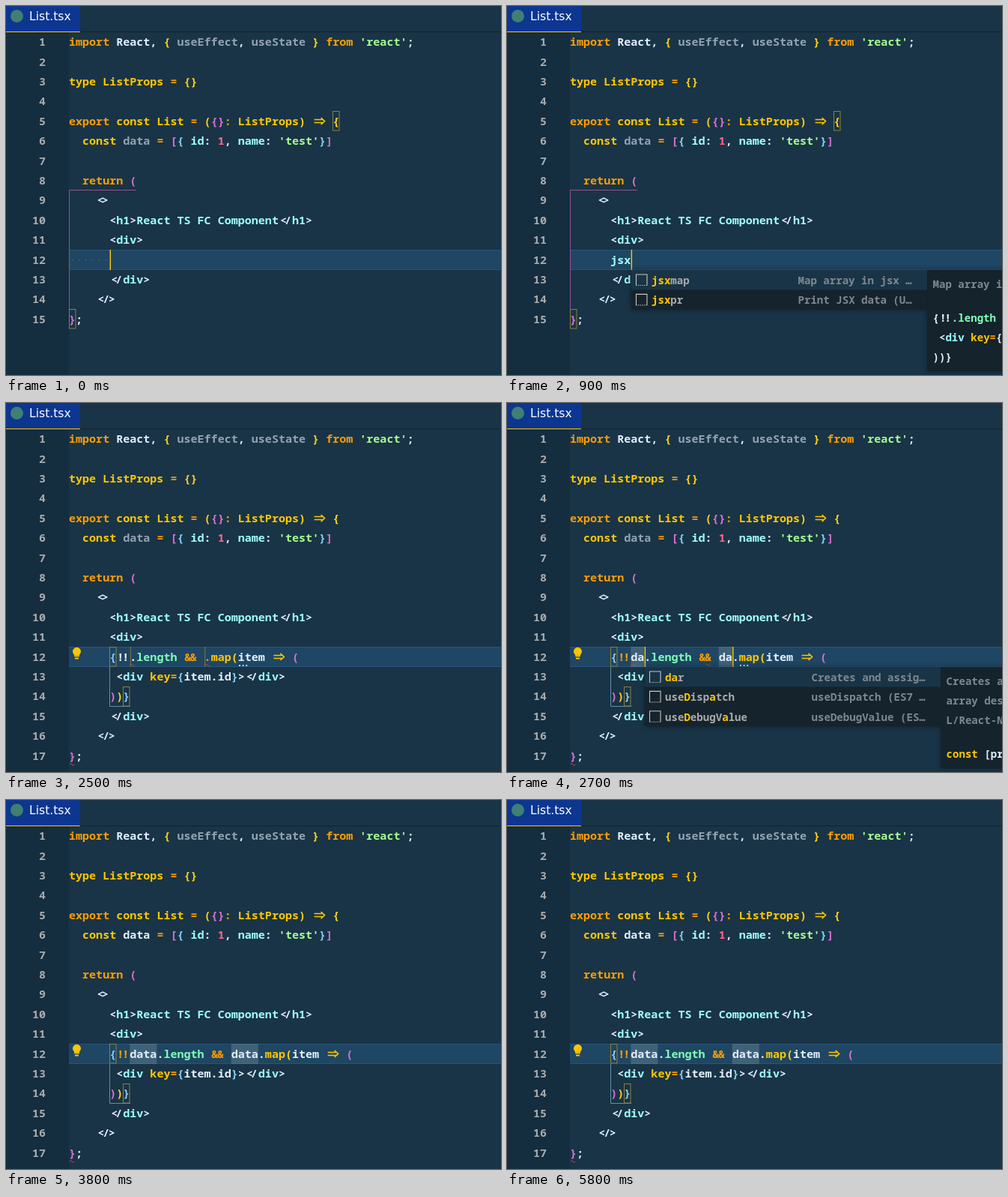
Recreate the animation shown at these times as an HTML page. Size 661 by 492 pixels, loop 5900 ms.

```html
<!DOCTYPE html>
<html lang="en">
<head>
<meta charset="utf-8">
<title>List.tsx</title>
<style>
  html, body { margin: 0; width: 100%; height: 100%; overflow: hidden; background: #193446; }
  svg { display: block; width: 661px; height: 492px; }
  text { white-space: pre; font: 600 15.05px "Noto Sans Mono", monospace; }
  .small text { font-size: 14.1px; }
  .popup { filter: drop-shadow(0 0 3px rgba(0, 0, 0, .4)); }
  .tab { font: 400 15.6px "DejaVu Sans", sans-serif; }
</style>
</head>
<body>
<svg id="stage" viewBox="0 0 661 492">
  <rect width="661" height="492" fill="#193446"/>
  <rect y="35" width="84" height="457" fill="#142d3f"/>
  <rect x="99" y="34" width="562" height="1" fill="#11232f"/>
  <rect width="99" height="34" fill="#0c3690"/>
  <rect y="34" width="99" height="1" fill="#ffc600"/>
  <circle cx="14.5" cy="13.5" r="8.5" fill="#3f7f74"/>
  <text class="tab" x="31" y="19" fill="#fff">List.tsx</text>
  <g id="editor"></g>
</svg>
<script>
const LOOP = 5900, LEFT = 84, CHAR = 9.03, SMALL_CHAR = 8.46, ROW = 26.4;
const COLORS = {
  w: '#e1efff', o: '#ff9d00', i: '#ff9d00', y: '#ffc600', d: '#94a3b3', g: '#a5ff90',
  G: '#80ffbb', c: '#9effff', p: '#ff628c', a: '#ffd21a', b: '#da70d6', s: '#87cefa',
  l: '#aaaaaa', k: '#7d888f'
};
// Tightened glyph pairs, as offsets from the column grid.
const LIGATURES = { '</>': [2.2, 0, -1.5], '<>': [1.5, -1.5], '</': [2, -1], '&&': [.7, -.7], '!!': [1, -1] };

const colX = col => LEFT + col * CHAR;
const rowY = line => 34.8 + (line - 1) * ROW;
const escapeXml = s => s.replace(/&/g, '&amp;').replace(/</g, '&lt;');
const rect = (x, y, w, h, fill, extra = '') =>
  `<rect x="${x}" y="${y}" width="${w}" height="${h}" fill="${fill}" ${extra}/>`;
const path = (d, stroke, width = 1, extra = '') =>
  `<path d="${d}" fill="none" stroke="${stroke}" stroke-width="${width}" ${extra}/>`;
const bracketBox = (col, line) =>
  rect(Math.round(colX(col)) + .5, Math.round(rowY(line)) + .5, 8.5, 25.5, 'none', 'stroke="#89803f"');
const squiggle = (x, y, waves) => path(`M${x} ${y}` + 'q1.5 -3 3 0t3 0'.repeat(waves), '#d8453c');

function arrow(x, base, color) {
  const y = base - 5.2;
  return path(`M${x + 2.5} ${y - 2}h11M${x + 2.5} ${y + 2}h11M${x + 11.5} ${y - 4.5}l5 4.5l-5 4.5`, color, 1.5);
}

// "~k" switches the colour to COLORS.k; every piece sits on the character grid.
function rich(markup, x, base, advance = CHAR) {
  let out = '', color = 'w';
  markup.split(/(~.)/).forEach(part => {
    if (/^~./.test(part)) { color = part[1]; return; }
    part.split(/(=>|<\/>|<>|<\/|&&|!!|\s+)/).forEach(piece => {
      const fill = COLORS[color];
      if (piece === '=>') out += arrow(x, base, fill);
      else if (piece.trim()) {
        const nudge = LIGATURES[piece];
        const xs = nudge ? nudge.map((n, i) => (x + i * advance + n).toFixed(2)).join(' ') : x.toFixed(2);
        const style = color === 'i' ? ' font-style="italic"' : '';
        out += `<text x="${xs}" y="${base}" fill="${fill}"${style}>${escapeXml(piece)}</text>`;
      }
      x += piece.length * advance;
    });
  });
  return out;
}

const JSX_LIST = {
  rows: [['~yjsx~lmap', 'Map array in jsx …'], ['~yjsx~lpr', 'Print JSX data (U…']],
  panel: [[371, '~kMap array in jsx'], [416, '~w{!!~G.length &&'], [442, '~w <~cdiv ~ykey~o=~w{item'], [468, '~w))}']]
};
const ARRAY_PANEL = [[371, '~kCreates and'], [397, '~karray destr'], [423, '~kL/React-Nat'], [468, '~yconst ~w[prop']];
const DA_LIST = {
  rows: [['~yda~lr', 'Creates and assig…'], ['~luse~yD~lisp~ya~ltch', 'useDispatch (ES7 …'],
    ['~luse~yD~lebugV~ya~llue', 'useDebugValue (ES…']],
  panel: ARRAY_PANEL
};
const D_LIST = {
  rows: [['~yd~lar', 'Creates and assig…'], ['~yd~lob', 'Creates and assig…'], ['~yd~lestruct', 'Creates and assig…'],
    ['~luse~yD~lispatch', 'useDispatch (ES7 …'], ['~luse~yD~lebugValue', 'useDebugValue (ES…']],
  panel: ARRAY_PANEL
};

function popup({ rows, panel }, x) {
  const top = 352, dark = '#15232c';
  let out = rect(x, top, 395, rows.length * ROW, dark) + rect(x, top, 395, ROW, '#193446');
  rows.forEach(([label, detail], i) => {
    const y = top + i * ROW;
    out += path(`M${x + 6.5} ${y + 20.5}v-14.5h14.5v14.5`, '#c5c5c5', 1.1)
      + path(`M${x + 6.5} ${y + 20.5}h15`, '#c5c5c5', 1.1, 'stroke-dasharray="1.2 1.4"')
      + rich(label, x + 27, y + 19, SMALL_CHAR)
      + rich('~k' + detail, x + 222.5, y + 19, SMALL_CHAR);
  });
  out += rect(x + 395.5, top, 300, 135, dark);
  panel.forEach(([y, line]) => { out += rich(line, x + 402.5, y + 5, SMALL_CHAR); });
  return `<g class="small popup">${out}</g>`;
}

function codeLines({ snippet, typed, used }) {
  const body = snippet ? [
    `      ~s{~${typed ? 'o' : 'w'}!!~w${typed}.~Glength ~o&& ~w${typed}~${typed ? 'w' : 'o'}.~ymap~a(~witem ~y=> ~b(`,
    '       ~w<~cdiv ~ykey~o=~s{~witem.id~s}~w></~cdiv~w>',
    '      ~b)~a)~s}'
  ] : ['      ~c' + typed];
  return [
    "~iimport ~wReact, ~a{ ~duseEffect~w, ~duseState ~a} ~ifrom ~g'react'~w;",
    '',
    '~ytype ListProps ~o= ~a{}',
    '',
    '~iexport ~yconst List ~o= ~a(~b{}~o: ~yListProps~a) ~y=> ~a{',
    `  ~yconst ~${used ? 'w' : 'd'}data ~o= ~b[~s{ ~cid~w: ~p1~w, ~cname~w: ~g'test'~s}~b]`,
    '',
    '  ~ireturn ~b(',
    '    ~w<>',
    '      ~w<~ch1~w>~cReact TS FC Component~w</~ch1~w>',
    '      ~w<~cdiv~w>',
    ...body,
    '      ~w</~cdiv~w>',
    '    ~w</>',
    '~b}~w;'
  ];
}

function scopeMarks({ snippet, frame }) {
  if (!snippet) {
    return path('M173.5 245.5H84.5V405', '#96528f') + bracketBox(39, 5) + bracketBox(0, 15);
  }
  return squiggle(85, 482, 1.5) + (frame
    ? path('M138.5 352V404.5H166', '#5f90ab') + bracketBox(6, 12) + bracketBox(8, 14) : '');
}

function bulb() {
  return '<circle cx="94.5" cy="331.3" r="5.5" fill="#ffc600"/>'
    + path('M92 335v2.5h5v-2.5z', '#ffc600', 1.5) + path('M92 340.5h5', '#ffc600', 2);
}

function draw(s) {
  const n = s.typed.length;
  const cursors = s.snippet ? [colX(9 + n), colX(20 + 2 * n)] : [colX(6 + n)];
  let out = rect(84, 325, 577, 27, '#1f4662') + path('M84 325.5H661M84 351.5H661', '#27557a');
  if (s.snippet && n) {
    cursors.forEach(x => { out += rect(x - n * CHAR, 325, n * CHAR, 27, '#fff', 'opacity=".15"'); });
  }
  out += scopeMarks(s);
  if (!s.snippet && !n) {
    for (let i = 0; i < 6; i++) out += `<circle cx="${colX(i + .5)}" cy="338.5" r=".8" fill="#51718a"/>`;
  }
  codeLines(s).forEach((line, i) => {
    const base = +(rowY(i + 1) + 18.4).toFixed(2);
    out += `<text x="53" y="${base}" text-anchor="end" fill="#aaa">${i + 1}</text>` + rich(line, LEFT, base);
  });
  if (s.bulb) out += bulb();
  if (s.marks) {
    const late = n === 4;
    out += squiggle(166, 349.5, 1) + squiggle(late ? 276 : 266, 349.5, 1);
    for (let i = 0; i < 3; i++) out += rect((late ? 319 : 311) + i * 4.6, 349, 2, 2, '#c9d3da');
  }
  cursors.forEach(x => { out += rect(x + .4, 325, 1.4, 27, '#ffc600', `opacity="${s.blink}"`); });
  if (s.popup) out += popup(s.popup, cursors[0] + .7);
  return out;
}

const steps = [
  [0, { typed: '', blink: 1 }],
  [300, { blink: .5 }], [400, { blink: 0 }],
  [600, { typed: 'j', blink: 1 }], [700, { typed: 'js', popup: JSX_LIST }], [900, { typed: 'jsx' }],
  [1400, { snippet: true, typed: '', popup: null }],
  [1500, { frame: true }], [1600, { bulb: true }], [1700, { marks: true }],
  [1800, { blink: .5 }], [1900, { blink: 0 }], [2200, { blink: .5 }], [2300, { blink: 1 }],
  [2500, { blink: .3 }],
  [2600, { typed: 'd', blink: 1, popup: D_LIST }], [2700, { typed: 'da', popup: DA_LIST }],
  [2900, { typed: 'dat', popup: null }], [3000, { typed: 'data' }],
  [3200, { used: true }], [3300, { marks: false }],
  [3600, { blink: .7 }], [3700, { blink: .3 }], [3800, { blink: 0 }],
  [4200, { blink: .5 }], [4300, { blink: 1 }],
  [4500, { blink: .7 }], [4600, { blink: .3 }], [4700, { blink: 0 }],
  [5000, { blink: .04 }], [5100, { blink: .5 }], [5200, { blink: 1 }],
  [5400, { blink: .8 }], [5600, { blink: .3 }], [5800, { blink: 0 }]
];

let state = {};
const scenes = steps.map(([time, change]) => {
  state = { ...state, ...change };
  return { time, state };
});

const editor = document.getElementById('editor');
const start = performance.now();
let shown = null;
function tick() {
  const t = (performance.now() - start) % LOOP;
  const scene = scenes.filter(s => s.time <= t).pop();
  if (scene !== shown) {
    editor.innerHTML = draw(scene.state);
    shown = scene;
  }
  requestAnimationFrame(tick);
}
tick();
</script>
</body>
</html>
```
